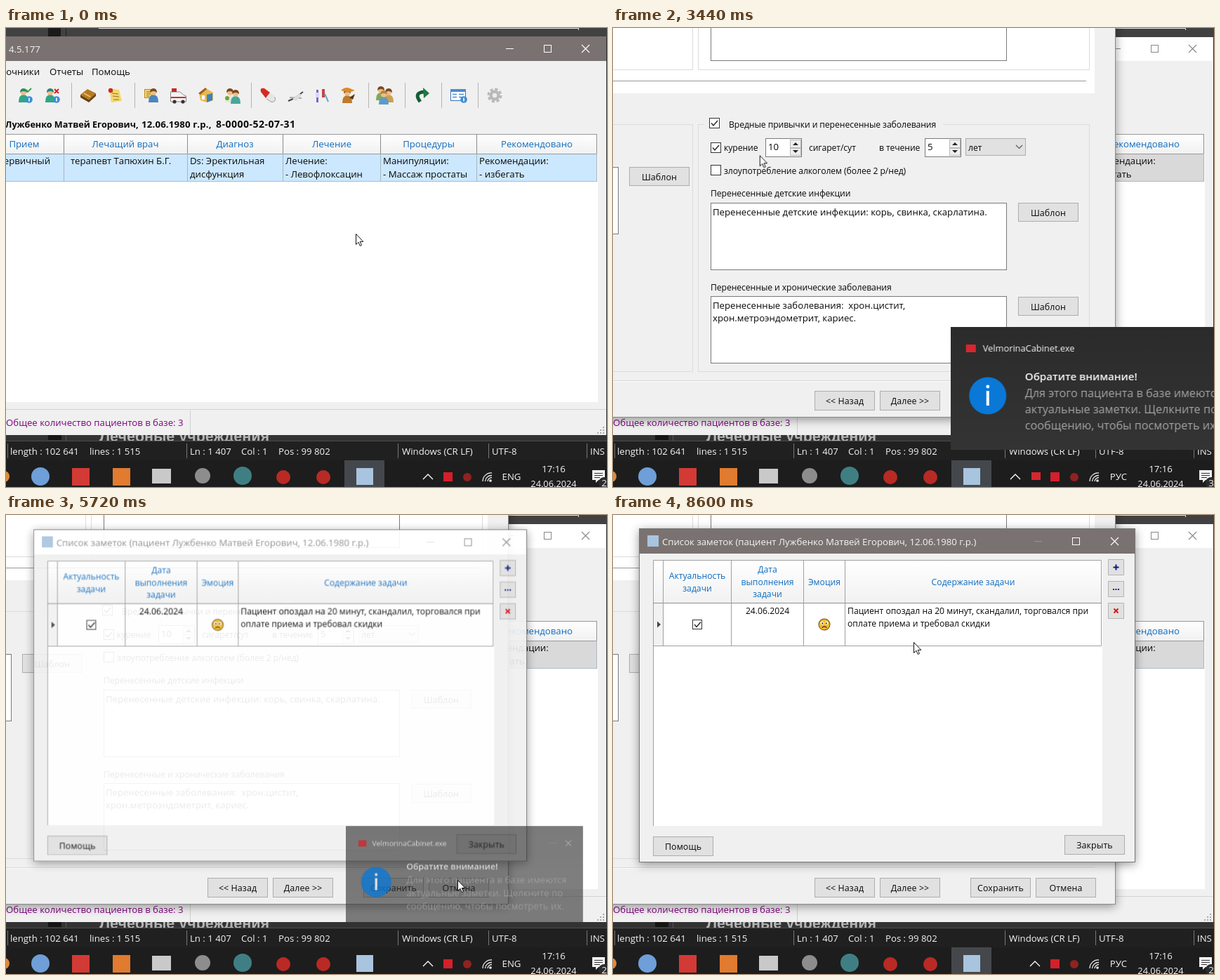
Recreate the animation shown at these times as an HTML page. Size 856 by 654 pixels, loop 9320 ms.

```html
<!DOCTYPE html>
<html lang="ru">
<head>
<meta charset="utf-8">
<title>Заметки пациента</title>
<style>
html, body { margin: 0; width: 100%; height: 100%; overflow: hidden; background: #222; }
svg { display: block; width: 856px; height: 654px; }
text { font: 13.2px "Open Sans", "Noto Sans", sans-serif; fill: #080808; white-space: pre; }
.d { font-size: 12.2px; letter-spacing: -.08px; }
.g { font-size: 12.2px; }
.k { font-size: 12.4px; letter-spacing: .1px; }
.h { fill: #0f6cbf; }
.w { fill: #f4f4f4; }
.b { font-weight: 700; font-size: 12.6px; }
.m { text-anchor: middle; }
.e { text-anchor: end; }

.step, .flow { animation-duration: 9320ms; animation-iteration-count: infinite; }
.step { animation-timing-function: step-end; }
.flow { animation-timing-function: ease-in-out; }

.main-on { animation-name: main-on; }
@keyframes main-on { 0% { opacity: 1 } 29.18% { opacity: 0 } }
.hover { animation-name: hover; }
@keyframes hover { 0% { opacity: 0 } 15.4% { opacity: 1 } 29.18% { opacity: 0 } }
.eng { animation-name: eng; }
@keyframes eng { 0% { opacity: 1 } 27.47% { opacity: 0 } 59.66% { opacity: 1 } 69.1% { opacity: 0 } }
.rus { animation-name: rus; }
@keyframes rus { 0% { opacity: 0 } 27.47% { opacity: 1 } 59.66% { opacity: 0 } 69.1% { opacity: 1 } }
.chev { animation-name: chev; }
@keyframes chev { 0% { transform: none } 30.47% { transform: translateX(-28px) } 60.09% { transform: none } }
.alert { animation-name: alert; }
@keyframes alert { 0% { opacity: 0 } 30.47% { opacity: 1 } 60.09% { opacity: 0 } }
.calm { animation-name: calm; }
@keyframes calm { 0% { opacity: 1 } 30.47% { opacity: 0 } 60.09% { opacity: 1 } }
.task { animation-name: task; }
@keyframes task { 0% { opacity: 1 } 59.66% { opacity: 0 } 72.1% { opacity: 1 } }
.toast-x { animation-name: toast-x; }
@keyframes toast-x { 0% { opacity: 0 } 42.9% { opacity: 1 } }
.notes-on { animation-name: notes-on; }
@keyframes notes-on { 0% { opacity: 0 } 70.82% { opacity: 1 } }

.shadow { filter: drop-shadow(0 3px 7px #0006); }
.card { animation-name: card; transform-origin: 100px 130px; animation-timing-function: linear; }
@keyframes card {
  0%, 28.76% { opacity: 0; transform: scale(.94) }
  29.61% { opacity: .5; transform: scale(.975) }
  31.33% { opacity: .93; transform: scale(.9965) }
  32.19%, 100% { opacity: 1; transform: none }
}
.notes { animation-name: notes; transform-origin: 390px 257px; animation-timing-function: linear; }
@keyframes notes {
  0%, 59.66% { opacity: 0; transform: scale(.92) }
  60.52% { opacity: .55; transform: scale(.97) }
  61.37% { opacity: .92; transform: scale(.9945) }
  62.66%, 100% { opacity: 1; transform: none }
}
.toast { animation-name: toast; transform-origin: 648px 513px; }
@keyframes toast {
  0%, 33.05% { transform: translateX(430px); animation-timing-function: ease-out }
  38.2%, 59.66% { transform: none; animation-timing-function: linear }
  61.37% { transform: translate(4.5px, 1px) scale(.814) }
  62.66% { transform: translate(8px, 2px) scale(.7); animation-timing-function: step-end }
  100% { transform: translateX(430px) }
}
.veil { animation-name: veil; }
@keyframes veil { 0%, 59.66% { opacity: 1 } 61.37% { opacity: .62 } 62.66%, 100% { opacity: 0 } }
.ink { animation-name: ink; }
@keyframes ink { 0%, 59.66% { opacity: 1 } 61.37% { opacity: .78 } 62.66%, 100% { opacity: 0 } }
.cursor { animation-name: cursor; }
@keyframes cursor {
  0%, 6% { transform: translate(498px, 293px) }
  15.88%, 33.05% { transform: translate(29px, 90px); animation-timing-function: ease-in }
  39.06% { transform: translate(401px, 279px); animation-timing-function: ease-out }
  49.79%, 50.3% { transform: translate(655px, 564px) }
  53.65%, 61.8% { transform: translate(643px, 520px) }
  70%, 72.5% { transform: translate(346px, 49px) }
  78.5% { transform: translate(300px, 100px) }
  81% { transform: translate(187px, 170px) }
  84% { transform: translate(310px, 237px) }
  86.7% { transform: translate(490px, 170px) }
  89.3% { transform: translate(392px, 198px) }
  92.27%, 99.99% { transform: translate(428px, 181px) }
  100% { transform: translate(498px, 293px) }
}
.click { animation-name: click; }
@keyframes click {
  0% { opacity: 0 } 23.17% { opacity: .78 } 24.46% { opacity: 0 }
  57.9% { opacity: .78 } 59.2% { opacity: 0 }
  70.82% { opacity: .78 } 72.1% { opacity: 0 }
}
</style>
</head>
<body>
<svg id="stage" viewBox="0 0 856 654"></svg>
<script>
const T = (x, y, s, cls = '', more = '') => `<text x="${x}" y="${y}" class="${cls}" ${more}>${s}</text>`;
const R = (x, y, w, h, fill, line) => line
  ? `<rect x="${x + .5}" y="${y + .5}" width="${w - 1}" height="${h - 1}" fill="${fill}" stroke="${line}"/>`
  : `<rect x="${x}" y="${y}" width="${w}" height="${h}" fill="${fill}"/>`;
const C = (x, y, r, fill) => `<circle cx="${x}" cy="${y}" r="${r}" fill="${fill}"/>`;
const P = (d, fill) => `<path d="${d}" fill="${fill}"/>`;
const L = (d, stroke, w = 1) => `<path d="${d}" fill="none" stroke="${stroke}" stroke-width="${w}"/>`;
const G = (cls, ...parts) => `<g class="${cls}">${parts.join('')}</g>`;
const each = (list, fn) => list.map(fn).join('');
const vline = (x, y1, y2, col) => L(`M${x + .5} ${y1}V${y2}`, col);

const button = (x, y, s, w = 86, h = 28) =>
  R(x, y, w, h, '#e1e1e1', '#adadad') + T(x + w / 2, y + h / 2 + 5, s, 'k m');
const cross = (x, y, r, col, w = 1) => L(`M${x - r} ${y - r}l${2 * r} ${2 * r}m0 ${-2 * r}l${-2 * r} ${2 * r}`, col, w);
const check = (x, y, on, s = 15) =>
  R(x, y, s, s, '#fff', '#333') + (on ? L(`M${x + 3} ${y + s / 2}l3 3.5 6-7`, '#222', 1.4) : '');
const frameButtons = (min, max, close, y, col, minCol = col) =>
  L(`M${min} ${y - .5}h11`, minCol) + R(max, y - 6, 11, 11, 'none', col) + cross(close + 5.5, y - .5, 5.5, col, 1.1);

const person = (x, y, coat, hair = '#7a4a20') =>
  P(`M${x - 7} ${y + 9}q0-11 7-11t7 11z`, coat) + C(x, y - 6, 4.5, '#f0bd8a') +
  P(`M${x - 5} ${y - 5}q0-6 5-6t5 6q-5-4-10 0z`, hair);
const page = (x, y) => R(x, y, 11, 13, '#f5d469', '#b98b25') + L(`M${x + 3} ${y + 4}h6m-6 3h6m-6 3h4`, '#96651a');
const info = (x, y) => C(x, y, 4.8, '#3b8fd6') + R(x - .8, y - 2.5, 1.6, 5, '#fff');

const icons = [
  person(25, 97, '#2fa587', '#238a70') + info(33, 102) + L('M29 88l2 3 5-5', '#39a53a', 2),
  person(63, 97, '#2fa587', '#238a70') + info(72, 102) + cross(72, 90, 3, '#d42020', 2),
  P('M106 95l10-8 12 6-10 9z', '#b67a22') + P('M106 95l12 7 10-9v4l-10 9-12-7z', '#6d430d') + L('M111 93l9 5', '#e8c070', 2),
  P('M147 86l14 2 4 16-15 2z', '#f2d76d') + L('M151 93l9 1m-8 3l9 1m-8 4l8 0', '#a06a20') + C(149, 89, 3.2, '#cc2a20'),
  page(197, 87) + person(210, 97, '#4b87bd'),
  P('M234 91h14l5 4 4 2v8h-23z', '#f3f3f3') + L('M234.5 91h13l5 4 4 2v8h-22z', '#888') + R(235, 98, 21, 2, '#cf3028') +
    C(240, 105, 2.6, '#333') + C(252, 105, 2.6, '#333') + R(236, 86, 7, 5, '#c42b27'),
  P('M275 93l10-7 10 6v11l-9 3-9-3z', '#e9b84f') + P('M274 93l10-8 2 2-9 8z', '#a06022') + P('M286 95l8-2v10l-8 3z', '#3d83bf') + R(279, 96, 4, 6, '#fff'),
  person(319, 97, '#e9e4dc') + person(327, 99, '#48a79b') + C(315, 100, 3, '#68a82e'),
  P('M363 91q-2-6 5-5l8 6-6 8z', '#d52b22') + P('M370 100l6-8 7 5q4 8-5 8z', '#e5e5e5') + L('M371 101l7 4.500q7 0 5-7', '#999'),
  L('M402 104l9-4m0 0l12-9', '#444', 2) + L('M404 99l17 1', '#aaa', 2) + P('M408 101l10-8 3 3-8 8z', '#d7dde0'),
  R(442, 88, 3, 18, '#7868c8') + R(441, 92, 5, 7, '#d8d8f4') + R(450, 87, 4, 12, '#c74444') + L('M454 94l5 11', '#62a4cf', 2),
  person(486, 98, '#bf7a2c') + P('M477 89q7-7 15-2l5 2-9 3z', '#d98b2b') + P('M489 99l8-5-3 8z', '#553414'),
  person(534, 94, '#7eac52') + person(545, 97, '#c9a152') + person(538, 100, '#5d9bc6', '#b98338'),
  L('M590 105q-10-13 6-14', '#155d35', 5) + P('M594 85l9 8-8 7z', '#1d7a42'),
  R(633, 87, 22, 17, '#fff', '#3a74b5') + R(633, 87, 22, 4, '#4c8ccd') + L('M636 94.5h6m3 0h7m-16 4h6m3 0h5', '#4c8ccd', 1.5) + info(652, 102),
  C(696, 96, 7.5, '#b9b9b9') + `<circle cx="696" cy="96" r="8.5" fill="none" stroke="#b9b9b9" stroke-width="4" stroke-dasharray="4 2.68"/>` + C(696, 96, 3.2, '#ededed')
].join('');

const backdrop =
  R(0, 0, 856, 654, '#2b2b2b') + R(0, 0, 856, 13, '#414141') + R(60, 0, 18, 13, '#1a1a1a') + vline(85, 0, 12, '#222') +
  L('M132 .5H815.5V3', '#e6e6e6') + R(0, 580, 856, 8, '#333') + R(60, 580, 19, 7, '#151515') + vline(85, 580, 588, '#555') +
  T(133, 589, 'Лечебные учреждения', '', 'style="font:bold 21.5px \'Liberation Sans\',sans-serif;fill:#b5b5b5"');

const columns = [[26, 'Прием', 82], [170, 'Лечащий врач', 258], [326, 'Диагноз', 394], [464, 'Лечение', 533], [602, 'Процедуры', 670], [756, 'Рекомендовано', 841]];
const cells = [[262, 'Ds: Эректильная', 'дисфункция'], [398, 'Лечение:', '- Левофлоксацин'], [537, 'Манипуляции:', '- Массаж простаты'], [674, 'Рекомендации:', '- избегать']];

const mainWindow =
  R(-2, 13, 857, 567, '#f0f0f0') + R(0, 13, 854, 34, '#fff') + T(4, 35, '4.5.177', '', 'style="fill:#999"') +
  frameButtons(712, 766, 820, 30, '#888') +
  G('step main-on', R(0, 12, 855, 35, '#7a7270'), T(4, 35, '4.5.177', 'w'), frameButtons(712, 766, 820, 30, '#fff')) +
  T(48, 67, 'Справочники', 'e') + T(62, 67, 'Отчеты') + T(122, 67, 'Помощь') +
  G('step hover', R(10, 77, 38, 36, '#cce8ff', '#99d1ff')) +
  each([93, 183, 349, 516, 568, 620, 672], x => vline(x, 78, 114, '#b5b5b5')) + icons +
  T(-1, 142, 'Лужбенко Матвей Егорович,', 'b') + T(193, 142, '12.06.1980 г.р.,', 'b', 'style="font-size:13.2px;letter-spacing:.2px"') +
  T(299, 142, '8-0000-52-07-31', 'b', 'style="font-size:14px;letter-spacing:.5px"') +
  R(0, 151, 843, 382, '#fff') + R(0, 151, 842, 28, 'url(#head)') + R(0, 179, 842, 40, '#d9d9d9') +
  G('step main-on', R(0, 179, 842, 40, '#cce8ff')) +
  L('M0 151.5H841M0 179.5H841', '#9a9a9a') + L('M0 218.5H841', '#a9bccb') +
  each(columns, ([x, s, edge]) => T(x, 170, s, 'h m') + vline(edge, 151, 179, '#8a8a8a') + vline(edge, 179, 219, '#a9b4bd')) +
  T(63, 194, 'Первичный', 'e') + T(92, 194, 'терапевт Тапюхин Б.Г.') +
  each(cells, ([x, a, b]) => T(x, 194, a) + T(x, 213, b)) +
  L('M0 543.5H855', '#d4d4d4') + vline(262, 545, 580, '#cfcfcf') +
  T(0, 567, 'Общее количество пациентов в базе: 3', '', 'style="fill:#800080"') +
  each([[850, 569], [850, 573], [850, 577], [846, 573], [846, 577], [842, 577]], ([x, y]) => R(x, y - 1, 2, 2, '#aaa'));

const taskbar =
  R(0, 588, 856, 28, '#202020') + L('M0 588.5H856', '#4b4b4b') + R(0, 616, 856, 38, '#1d1d1d') +
  each([2, 257, 558, 687, 827], x => vline(x, 592, 613, '#777')) +
  each([[6, 'length : 102 641'], [119, 'lines : 1 515'], [262, 'Ln : 1 407'], [335, 'Col : 1'], [388, 'Pos : 99 802'], [564, 'Windows (CR LF)'], [692, 'UTF-8'], [832, 'INS']],
    ([x, s]) => T(x, 608, s, 'w')) +
  G('step task', R(482, 616, 57, 38, '#44484c')) +
  C(-3, 639, 8, '#e08a3a') + C(49, 639, 13, '#6f9fd8') + R(94, 627, 25, 25, '#d33a35') + R(152, 627, 25, 25, '#e07b30') +
  R(208, 628, 27, 21, '#c9c9c9') + C(280, 638, 11, '#8d8d8d') + C(337, 638, 13, '#3f7f83') +
  C(395, 640, 10, '#b92a25') + C(452, 640, 10, '#b92a25') + R(499, 627, 24, 24, '#a9c4df') +
  G('step chev', L('M594 643l7-7 7 7', '#fff', 1.3)) + G('step alert', R(596, 633, 13, 11, '#d8262e')) +
  R(623, 633, 13, 13, '#d3202a') + C(657, 640, 6, '#8f2320') +
  L('M679 646a12 12 0 0 1 13-12M682.500 646a9 9 0 0 1 9.500-8.500M686 646a6 6 0 0 1 6-5.500', '#e8e8e8', 1.3) + C(690, 645, 1.8, '#fff') +
  T(720, 644, 'ENG', 'w m step eng') + T(720, 644, 'РУС', 'w m step rus') +
  T(780, 633, '17:16', 'w m') + T(780, 654, '24.06.2024', 'w m', 'style="font-size:12.8px"') +
  P('M835 630h18v14h-9l-4 4v-4h-5z', '#f2f2f2') + L('M838 634.5h12m-12 3h12m-12 3h8', '#333') + C(852, 648, 8, '#2b2b2b') +
  T(852, 653, '2', 'w m step calm') + T(852, 653, '3', 'w m step alert');

const spin = (x, s) => R(x, 157, 52, 27, '#fff', '#7a7a7a') + T(x + 4, 174, s) +
  R(x + 35, 159, 16, 12, '#eee', '#bbb') + R(x + 35, 171, 16, 11, '#eee', '#bbb') +
  P(`M${x + 39} 167l4-4 4 4z`, '#222') + P(`M${x + 39} 174l4 4 4-4z`, '#222');
const area = (x, y, w, h) => R(x, y, w, h, '#fff', '#7a7a7a');

const card = G('flow card', G('shadow',
  R(-30, -30, 746, 585, '#f0f0f0', '#8a8a8a'),
  R(-30, -30, 716, 123, '#fff'), R(-9, -9, 123, 69, 'none', '#dcdcdc'), R(121, -9, 558, 69, 'none', '#dcdcdc'),
  area(139, -9, 422, 56), L('M0 75.5H674', '#999'),
  R(-9, 137, 123, 353, 'none', '#dcdcdc'), R(121, 137, 558, 353, 'none', '#dcdcdc'), R(130, 134, 340, 7, '#f0f0f0'),
  L('M0 502.500H686', '#d5d5d5'), L('M0 503.500H686', '#fff'),
  area(-9, 198, 17, 96), button(23, 198, 'Шаблон', 86, 27),
  check(137, 128, true), T(165, 142, 'Вредные привычки и перенесенные заболевания', 'd'),
  check(139, 163, true), T(158, 175, 'курение', 'd'), spin(217, '10'), T(279, 175, 'сигарет/сут', 'd'),
  T(379, 175, 'в течение', 'd'), spin(444, '5'),
  R(502, 157, 86, 25, '#e1e1e1', '#adadad'), T(506, 175, 'лет', 'd'), L('M574 167l4.500 4.500 4.500-4.500', '#555', 1.2),
  check(139, 195, false), T(158, 208, 'злоупотребление алкоголем (более 2 р/нед)', 'd'),
  T(139, 240, 'Перенесенные детские инфекции', 'd'), area(139, 249, 422, 96),
  T(142, 267, 'Перенесенные детские инфекции: корь, свинка, скарлатина.'), button(577, 249, 'Шаблон', 86, 27),
  T(139, 374, 'Перенесенные и хронические заболевания', 'd'), area(139, 382, 422, 96),
  T(142, 400, 'Перенесенные заболевания:  хрон.цистит,'), T(142, 418, 'хрон.метроэндометрит, кариес.'),
  button(577, 383, 'Шаблон', 86, 27),
  button(287, 517, '&lt;&lt; Назад'), button(380, 517, 'Далее &gt;&gt;'), button(509, 517, 'Сохранить'), button(602, 517, 'Отмена')));

const notesTitle = 'Список заметок (пациент Лужбенко Матвей Егорович, 12.06.1980 г.р.)';
const tool = y => R(705, y, 23, 23, '#e1e1e1', '#b5b5b5');
const headings = [[120, 91, 'Актуальность'], [120, 109, 'задачи'], [220, 82, 'Дата'], [220, 100, 'выполнения'], [220, 117, 'задачи'], [301, 100, 'Эмоция'], [513, 100, 'Содержание задачи']];

const notes = G('flow notes', G('shadow',
  R(37, 19, 707, 476, '#f0f0f0', '#777'), R(38, 20, 705, 35, '#fff'), T(70, 43, notesTitle, '', 'style="fill:#8a8a8a"'),
  frameButtons(600, 654, 709, 38, '#888', '#ddd'),
  G('step notes-on', R(38, 20, 705, 35, '#7a7270'), T(70, 43, notesTitle, 'w'), frameButtons(600, 654, 709, 38, '#fff', '#989190')),
  R(49, 29, 16, 16, '#a9c4df'),
  R(57, 64, 640, 379, '#fff'), R(57, 64, 639, 62, 'url(#head)'), R(57, 126, 14, 60, '#f2f2f2'),
  L('M57.500 443V64.500H695.500V186.500H57', '#a0a0a0'), L('M57 125.500H696', '#8f8f8f'),
  each([71, 168, 271, 330], x => vline(x, 64, 186, '#a0a0a0')),
  each(headings, ([x, y, s]) => T(x, y, s, 'g h m')),
  P('M63 151.500l5 4.500-5 4.500z', '#444'), check(113, 149, true, 14),
  T(220, 141, '24.06.2024', 'g m'),
  C(301, 156, 8.5, '#6d4a08'), C(301, 156, 7.5, '#f3bd2e'), C(298, 154, 2.3, '#fff'), C(304, 154, 2.3, '#fff'),
  C(298.3, 154.3, 1.1, '#222'), C(303.7, 154.3, 1.1, '#222'), L('M297.500 160.500q3.500-3 7 0', '#5a3006', 1.4),
  T(334, 141, 'Пациент опоздал на 20 минут, скандалил, торговался при', 'g'),
  T(334, 159, 'оплате приема и требовал скидки', 'g'),
  tool(63), L('M712.500 74.500h8m-4-4v8', '#0a1a80', 2),
  tool(94), each([712, 715.5, 719], x => R(x, 105, 2, 2, '#0a1a80')),
  tool(125), cross(716.5, 136.5, 3, '#d81818', 2),
  button(57, 458, 'Помощь'), button(643, 456, 'Закрыть')));

const grey = 'style="font-size:16.2px;fill:#a5a5a5"';
const toast = G('flow toast', G('flow veil', R(441, 426, 415, 175, 'url(#dark)')), G('flow ink',
  R(463, 451, 14, 11, '#d8262e'),
  T(487, 461, 'VelmorinaCabinet.exe', 'w', 'style="font-size:12.8px"'),
  G('step toast-x', each([799, 804, 809], x => C(x, 456, 1, '#aaa')), cross(830.5, 456, 5, '#bbb', 1.1)),
  C(494, 524, 26.5, '#0a78d7'), C(494, 511, 2.4, '#fff'), R(492, 517, 4, 21, '#fff'),
  T(547, 502, 'Обратите внимание!', 'w', 'style="font-weight:600;font-size:15.1px"'),
  T(547, 526, 'Для этого пациента в базе имеются', '', grey),
  T(547, 549, 'актуальные заметки. Щелкните по', '', grey),
  T(547, 572, 'сообщению, чтобы посмотреть их.', '', grey)));

const cursor = G('flow cursor',
  '<path d="M.5.5v15l3.400-3.300 2.400 5.300 2.200-1-2.300-5.100h4.600z" fill="#fff" stroke="#111"/>',
  G('step click', C(0, 1, 13.5, '#e3d21c')));

const gradient = (id, a, b) => `<linearGradient id="${id}" x2="0" y2="1"><stop stop-color="${a}"/><stop offset="1" stop-color="${b}"/></linearGradient>`;

document.getElementById('stage').innerHTML =
  `<defs>${gradient('head', '#fff', '#f1f1f1')}${gradient('dark', '#2b2b2b', '#343434')}</defs>` +
  backdrop + mainWindow + taskbar + card + notes + toast + cursor;
</script>
</body>
</html>
```
